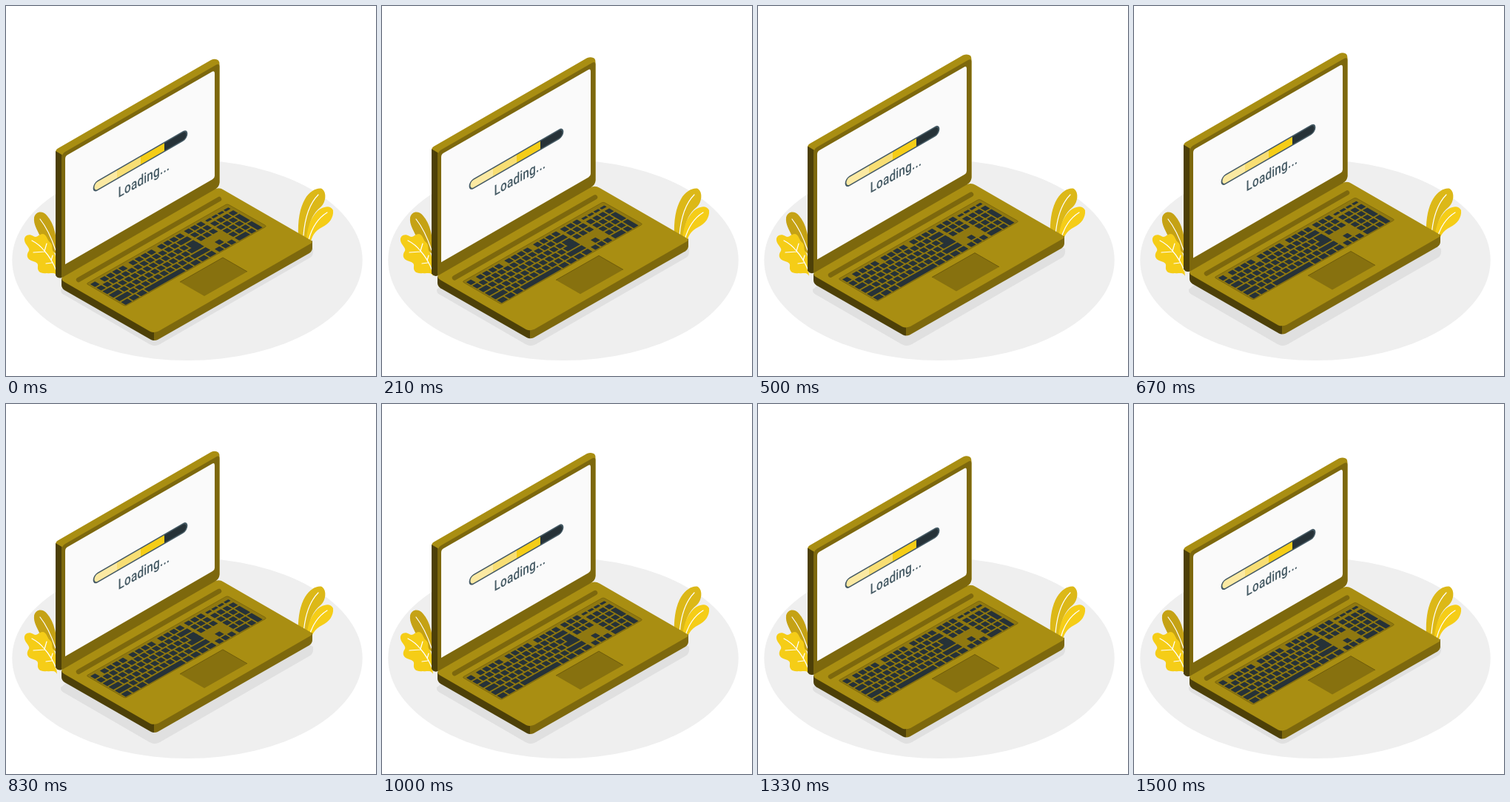
Write an HTML page that moves like this. It is 500 px wide and 500 px high and loops after 1.54 s.

```html
<!DOCTYPE html>
<html lang="en">
<head>
<meta charset="utf-8">
<title>Loading laptop</title>
<style>
  html, body { margin: 0; width: 100%; height: 100%; overflow: hidden; background: #fff; }
  svg { display: block; width: 100vw; height: 100vh; }
  .gold { fill: #a98e12; }
  .mid { fill: #7d680d; }
  .dark { fill: #4d4008; }
  .key { fill: #263238; }
  .vein { fill: none; stroke: #fff; stroke-width: 1.2; stroke-linecap: round; }
  text { font: 500 19.5px Roboto, Arial, sans-serif; letter-spacing: .2px; fill: #455a64; }
</style>
</head>
<body>
<svg viewBox="0 0 500 500">
  <defs>
    <clipPath id="capsule"><rect x="118.500" y="240" width="126" height="12" rx="5.200" ry="6"/></clipPath>
  </defs>

  <ellipse cx="245" cy="343.5" rx="236.700" ry="135.500" fill="#efefef"/>
  <path fill="#e0e0e0" d="M74 383Q73 388 80 391L194 457Q201 461 208 457L411 340Q416 337 415 328L300 270L90 370Z"/>

  <g id="leftPlant">
    <path fill="#c5a215" d="M68 335C57 328 50 321 46 311C42 302 37 295 38 286C40 277 50 276 56 284C64 294 68 306 70 333Z"/>
    <path fill="#f5cd17" d="M69 365C66 359 61 362 55 361C47 362 42 359 43 352C44 347 40 346 34 344C27 341 28 335 31 331C33 327 26 323 25 317C24 310 31 307 37 311C42 314 43 309 49 308C55 308 55 315 59 319C64 322 61 328 64 332C69 338 67 348 69 365Z"/>
    <path class="vein" d="M46 288Q58 303 67 330M35 317Q45 322 52 331Q62 342 68 358M52 331L55 321M52 332L37 333M62 347L54 348M61 344L63 337"/>
  </g>

  <g id="rightPlant">
    <path fill="#dcb818" d="M395 312C394 290 397 273 404 261C410 250 421 245 427 247C434 252 432 265 426 271C414 281 409 292 408 315Z"/>
    <path fill="#f5cd17" d="M405 322C407 300 411 287 421 277C429 270 439 269 442 276C443 286 437 294 427 299C417 304 413 311 411 323Z"/>
    <path class="vein" d="M422 255Q405 272 402 310M434 279Q416 290 409 316"/>
  </g>

  <g id="laptop">
    <path class="dark" d="M75 368V377Q75 381 79 384L196 451Q198 452 200 452V438Z"/>
    <path class="mid" d="M200 438V452Q203 452 205 451L410 334Q414 331 414 327V317Z"/>
    <path class="gold" d="M79 373Q72 369 78 365L281 248Q288 244.500 294 248.500L411 316Q416 319 411 321.500L206 439.500Q200 442 195 440Z"/>
    <path d="M98 370L288 261" stroke="#7d680d" stroke-width="6.500" stroke-linecap="round"/>
    <path fill="#8f7810" stroke="#7d680d" d="M110 374.500L297 268.500Q299 267.500 301 268.500L350.500 296.500Q352 297.500 350.500 298.500L163 404.500Q161 405.500 159 404.500L110 376Q109 375 110 374.500Z"/>
    <g id="keys" class="key" transform="matrix(8.3 -4.7 8.3 4.85 108 375)"/>
    <path fill="#87710f" d="M235 373L293 340L326 359L268 392Z"/>
    <path fill="none" stroke="#6f5c0b" d="M235 373L293 340L326 359"/>

    <path class="gold" d="M67 198Q67 194 70 192.500L277 73Q283 70.500 287 73.500Q288.500 75 288.500 79V238Q288.500 244 282 248L75 367Z"/>
    <path class="dark" d="M67 196L75.500 201V367Q70 369 67 364Z"/>
    <path class="mid" d="M75 207Q75 200 80 197L284 79.500Q288.500 77 288.500 82V238Q288.500 244 282 248L75 367.500Z"/>
    <path fill="#fafafa" d="M80 207Q80 203 83 201.300L279 88.600Q282 87 282 91V229.500Q282 232.500 279 234.200L80 349Z"/>
    <g transform="translate(118 246) skewY(-30) translate(-118 -246)">
      <g id="bar" clip-path="url(#capsule)"/>
      <rect x="118.500" y="240" width="126" height="12" rx="5.200" ry="6" fill="none" stroke="#455a64" stroke-width="1.800"/>
    </g>
    <text transform="matrix(.79 -.435 0 1 151.500 259.300)">Loading...</text>
  </g>
</svg>

<script>
const byId = id => document.getElementById(id);

function addRect(parent, x, y, width, height, more = {}) {
  const r = document.createElementNS('http://www.w3.org/2000/svg', 'rect');
  for (const [k, v] of Object.entries({ x, y, width, height, ...more })) r.setAttribute(k, v);
  parent.append(r);
}

// Progress segments: left edge and colour
[[118, '#fbe9a2'], [150, '#f8de74'], [182, '#f5cd17'], [214, '#263238']]
  .forEach(([x, fill]) => addRect(byId('bar'), x, 239, 32, 14, { fill }));

// Keys in key-cap units: column, row, width, height
const gap = 0.22;
const key = (x, y, w = 1, h = 1) =>
  addRect(byId('keys'), x + 0.15 + gap / 2, y + 0.33 + gap / 2, w - gap, h - gap, { rx: 0.06 });

function run(x, y, widths) {
  for (const w of widths) { key(x, y, w); x += w; }
}
const ones = n => Array(n).fill(1);

key(0, 0);
[1.55, 6.2, 10.85].forEach(x => run(x, 0, ones(4)));
run(15.25, 0, ones(3));
for (let i = 0; i < 4; i++) key(18.5 + i, 0.2, 1, 0.6);

run(0, 1, [...ones(13), 2]);
run(0, 2, [1.5, ...ones(12), 1.5]);
run(0, 3, [1.75, ...ones(11), 2.25]);
key(13.5, 2.5, 1.5, 1);
run(0, 4, [2.25, ...ones(10), 2.75]);
run(0, 5, [1.25, 1.25, 1.25, 6.25, 1.25, 1.25, 1.25, 1.25]);

run(15.25, 1, ones(3));
run(15.25, 2, ones(3));
key(16.25, 4);
run(15.25, 5, ones(3));

for (let y = 1; y < 5; y++) run(18.5, y, ones(3));
run(18.5, 5, [2, 1]);
key(21.5, 1);
key(21.5, 2, 1, 2);
key(21.5, 4, 1, 2);

// Linear rise and fall, sampled in even steps
const LOOP = 1540, STEP = LOOP / 37, PEAK = 735, REST = 1495;

function lift(t) {
  if (t < PEAK) return 0.6 + 9.4 * t / PEAK;
  return Math.max(0, 10 * (REST - t) / (REST - PEAK));
}

const start = performance.now();
function draw() {
  const t = (performance.now() - start) % LOOP;
  const held = Math.min(36, Math.floor((t + 2) / STEP)) * STEP;
  byId('laptop').setAttribute('transform', `translate(0 ${(0.6 - lift(held)).toFixed(3)})`);
  requestAnimationFrame(draw);
}
draw();
</script>
</body>
</html>
```
